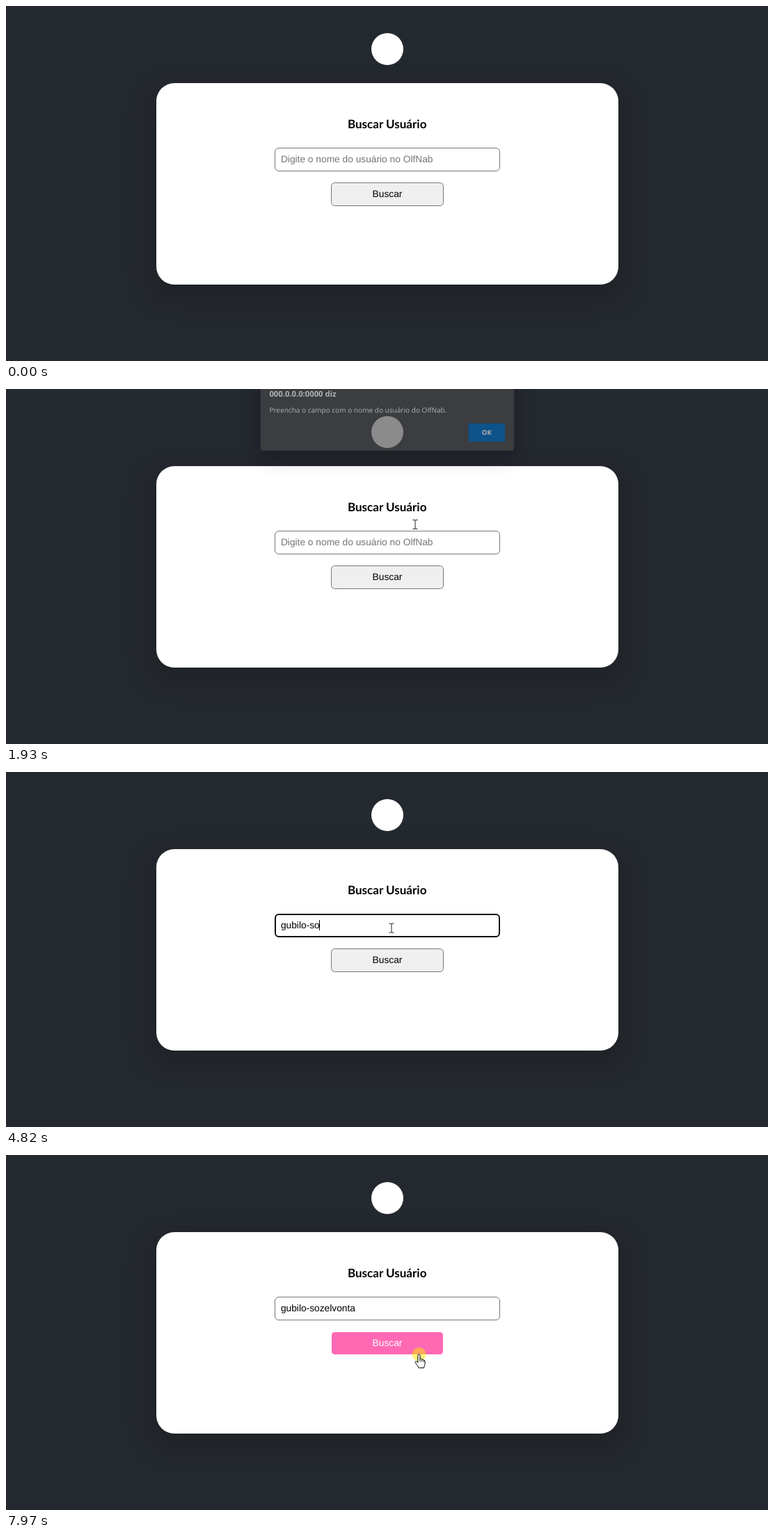
Recreate the animation shown at these times as an HTML page. Size 1095 px wide and 511 px high, loop 8 s.

```html
<!DOCTYPE html>
<html lang="pt">
<head>
<meta charset="utf-8">
<title>Buscar Usuário</title>
<style>
  html, body { margin: 0; width: 100%; height: 100%; overflow: hidden; background: #24282f; }
  svg { display: block; width: 100vw; height: 100vh; }
  text { text-rendering: geometricPrecision; white-space: pre; }
  .ui { font: 13.75px "Liberation Sans", Arial, sans-serif; }
  .title { font: 700 17px Lato, sans-serif; }
  .dialog { font: 10px "Open Sans", "Noto Sans", sans-serif; fill: #fff; }
  .mid { text-anchor: middle; }
  .blur-l { filter: blur(18px); }
  .blur-s { filter: blur(13px); }
</style>
</head>
<body>
<svg viewBox="0 0 1095 511">
  <rect class="blur-l" x="212" y="124" width="672" height="292" rx="26" fill="#1c2021" opacity=".75"/>
  <circle cx="548" cy="62" r="23" fill="#fff"/>
  <rect x="216" y="111" width="664" height="290" rx="26" fill="#fff"/>
  <text class="title mid" x="547.7" y="176">Buscar Usuário</text>

  <rect id="field" fill="#fff"/>
  <text id="entry" class="ui" x="394.9" y="225"></text>
  <rect id="caret" y="213" width="1" height="15"/>

  <rect id="button"/>
  <text id="label" class="ui mid" x="548" y="275">Buscar</text>

  <g id="alert">
    <rect class="blur-s" x="367" y="-20" width="362" height="128" rx="4" opacity=".34"/>
    <rect x="367" y="-30" width="362" height="125.5" rx="3.5" fill="#4a4a4a"/>
    <text class="dialog" x="379.5" y="18.5" style="font-size:11.2px;font-weight:700">000.0.0.0:0000 diz</text>
    <text class="dialog" x="379.5" y="41">Preencha o campo com o nome do usuário do OlfNab.</text>
    <rect x="664" y="56.5" width="52" height="26" fill="#006cbe"/>
    <text class="dialog mid" x="690" y="73" style="font-size:9.6px;font-weight:700">OK</text>
  </g>

  <g id="pointer">
    <circle id="click" r="10" fill="#ffeb00" opacity=".5"/>
    <path id="arrow" d="M0 0V14.5L3.4 11.3L5.6 16.4L7.9 15.4L5.7 10.4H10.4Z"
      fill="#fff" stroke="#000" stroke-width=".9" stroke-linejoin="round"/>
    <path id="hand" d="M-1.6 1.2C-1.5-.5 1.4-.5 1.5 1.2V6.8C2.2 5.8 4 6 4.3 7.5C5 6.7 6.5 7 6.8 8.4C7.8 8 8.6 8.8 8.6 10V13.2C8.6 15.2 7.4 16 7.2 19.4H-.4C-.8 17.2-4 14.6-5.3 11.6C-5.8 9.8-4 9.2-2.8 10.6L-1.6 12ZM1.5 6.8V10.4M4.3 7.5V10.6M6.8 8.4V10.8"
      fill="#fff" stroke="#000" stroke-width="1" stroke-linejoin="round"/>
    <path id="beam" d="M-3.5-6.5H-1Q0-6.5 0-5.5V5.5Q0 6.5-1 6.5H-3.5M3.5-6.5H1Q0-6.5 0-5.5M3.5 6.5H1Q0 6.5 0 5.5"
      fill="none" stroke="#222" stroke-width="1"/>
  </g>
</svg>
<script>
const LOOP = 8000, BLINK = 530, FOCUS = 2420, BLUR = 7970;
const HINT = 'Digite o nome do usuário no OlfNab';
const NAME = 'gubilo-sozelvonta';
const KEYS = [3080, 3160, 3350, 3550, 3750, 4020, 4480, 4680, 4820,
  5210, 5280, 5750, 5880, 6080, 6290, 6610, 6740];

// time, x, y, shape: each pose holds until the next
const MOVES = [
  [340, 955, 449, 'arrow'], [420, 890, 430, 'arrow'], [500, 800, 390, 'arrow'],
  [590, 700, 340, 'arrow'], [670, 625, 298, 'arrow'], [750, 588.5, 274, 'hand'],
  [1330, 588.5, 220.5, 'hand'], [1400, 624, 150, 'hand'], [1470, 668, 92, 'arrow'],
  [1540, 688, 70, 'arrow'], [1790, 680, 82, 'arrow'], [1860, 636, 135, 'arrow'],
  [1930, 588, 195, 'beam'], [2000, 568, 212, 'beam'], [2070, 560, 219, 'beam'],
  [2200, 557, 222, 'beam'], [2280, 554, 224.7, 'beam'],
  [7410, 606, 215, 'beam'], [7480, 688, 206, 'beam'], [7550, 738, 222, 'arrow'],
  [7620, 724, 252, 'arrow'], [7690, 664, 279, 'arrow'], [7760, 612, 285, 'hand'],
  [7830, 593.5, 287, 'hand']
];
const CLICKS = [[840, 930], [1680, 1760], [2420, 2480], [7970, 8000]];
const HOVERS = [[750, 1800], [7760, 8000]];

const $ = id => document.getElementById(id);
const set = (id, attrs) => {
  for (const k in attrs) $(id).setAttribute(k, attrs[k]);
};
const show = (id, on) => set(id, { visibility: on ? 'visible' : 'hidden' });
const within = (t, spans) => spans.some(([a, b]) => t >= a && t < b);
const clamp = v => Math.min(1, Math.max(0, v));

function box(id, x, y, w, h, rx, stroke, line) {
  set(id, { x, y, width: w, height: h, rx, stroke, 'stroke-width': line });
}

function drawAlert(t) {
  const held = 40 + Math.floor((t - 40) / 70) * 70;
  const open = clamp((held - 890) / 200) * clamp((2070 - held) / 220);
  const away = 1 - open;
  set('alert', {
    opacity: open,
    transform: `translate(548 ${-20 * away}) scale(${1 + .018 * away}) translate(-548 0)`
  });
}

function drawField(t) {
  const focused = t >= FOCUS && t < BLUR;
  if (focused) box('field', 387, 205, 322, 32, 5, '#101010', 2);
  else box('field', 386.5, 204.5, 323, 33, 5.5, '#767676', 1);

  const count = KEYS.filter(k => k <= t).length;
  const entry = $('entry');
  entry.textContent = count ? NAME.slice(0, count) : HINT;
  set('entry', { fill: count ? '#000' : '#757575' });

  const since = t - (count ? KEYS[count - 1] : FOCUS - 70);
  const width = count ? entry.getComputedTextLength() : 0;
  set('caret', { x: Math.floor(395.1 + width) });
  show('caret', focused && Math.floor(since / BLINK) % 2 === 0);
}

function drawButton(t) {
  const hover = within(t, HOVERS);
  if (hover) box('button', 468, 255, 160, 32, 4.5, 'none', 0);
  else box('button', 467.5, 254.5, 161, 33, 5, '#767676', 1);
  set('button', { fill: hover ? '#ff69b4' : '#efefef' });
  set('label', { fill: hover ? '#fff' : '#000' });
}

function drawPointer(t) {
  const pose = MOVES.filter(m => m[0] <= t).pop();
  for (const shape of ['arrow', 'hand', 'beam']) show(shape, pose && pose[3] === shape);
  show('click', within(t, CLICKS));
  if (pose) set('pointer', { transform: `translate(${pose[1]} ${pose[2]})` });
}

function draw(t) {
  drawAlert(t);
  drawField(t);
  drawButton(t);
  drawPointer(t);
}

const start = performance.now();
function tick() {
  draw((performance.now() - start) % LOOP);
  requestAnimationFrame(tick);
}
tick();
</script>
</body>
</html>
```
